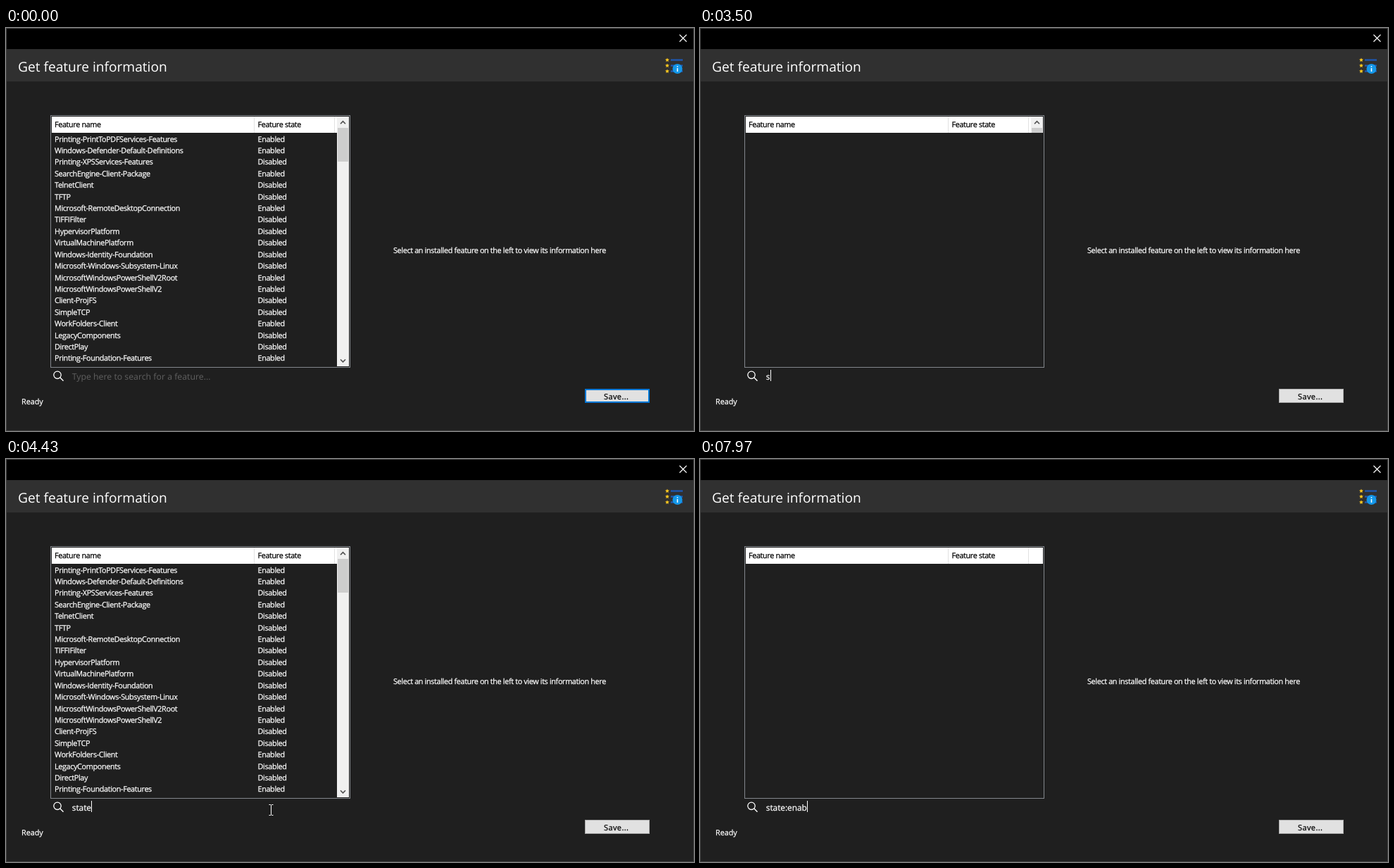
These frames come from a looping animation (977x573 px, 8 s). An HTML page:

```html
<!DOCTYPE html>
<html lang="en">
<head>
<meta charset="utf-8">
<title>Get feature information</title>
<style>
  html, body { margin: 0; width: 100%; height: 100%; overflow: hidden; background: #1f1f1f; }
  svg { display: block; color: #fff; }
  text {
    font: 10.8px "Open Sans", "Noto Sans", sans-serif;
    letter-spacing: -.34px;
    fill: currentColor;
    stroke: currentColor;
    stroke-width: .25px;
    white-space: pre;
    text-rendering: geometricPrecision;
  }
  .head { color: #000; }
  .ui { letter-spacing: 0; }
  .title { font-size: 19.15px; stroke: none; }
  .hint { font-size: 12.3px; color: #606060; stroke: none; }
  .query { font-size: 11.8px; }
  .save { font-size: 11px; letter-spacing: .4px; color: #000; }
  .line { fill: none; stroke: #fff; }
  .chevron { fill: none; stroke: #505050; stroke-width: 1.6; }
</style>
</head>
<body>
<svg width="977" height="573" viewBox="0 0 977 573">
  <rect width="977" height="573" fill="#1f1f1f"/>
  <rect width="977" height="30"/>
  <rect y="30" width="977" height="46" fill="#303030"/>
  <rect class="line" x=".5" y=".5" width="976" height="572" style="stroke:#414141"/>
  <path class="line" d="M956.5 9.5l10 10m0-10l-10 10" stroke-width="1.2"/>
  <text class="ui title" x="17" y="62">Get feature information</text>

  <path d="M944 45.5h17M944 53.5h17M944 61.5h17" stroke="#1f56ab" stroke-width="2.6"/>
  <g id="stars" fill="#ffc91f"></g>
  <circle cx="953.5" cy="58" r="7" fill="#1497e8"/>
  <path d="M953.5 57v5M953.5 54v1.6" stroke="#fff" stroke-width="1.5"/>

  <rect class="line" x="63.5" y="124.5" width="425" height="358" style="stroke:#83878c"/>
  <rect x="65" y="126" width="422" height="23" fill="#fff"/>
  <path d="M352.5 126v23M466.5 126v23" stroke="#e2e2e2"/>
  <text class="head" x="69" y="141">Feature name</text>
  <text class="head" x="357.5" y="141">Feature state</text>
  <g id="rows"></g>

  <g id="barTop">
    <rect x="470" y="126" width="17" height="23" fill="#f0f0f0"/>
    <rect x="471" y="142" width="15" height="7" fill="#cdcdcd"/>
    <path class="chevron" d="M475 136.2l3.5-3.5 3.5 3.5"/>
  </g>
  <g id="barRest">
    <rect x="470" y="149" width="17" height="332" fill="#f0f0f0"/>
    <rect x="471" y="149" width="15" height="41" fill="#cdcdcd"/>
    <path class="chevron" d="M475 471.3l3.5 3.5 3.5-3.5"/>
  </g>

  <circle class="line" cx="73" cy="493.3" r="5.2" stroke-width="1.3"/>
  <path class="line" d="M76.8 497l4.7 4.7" stroke-width="1.4"/>
  <text id="hint" class="ui hint" x="93.7" y="499.5">Type here to search for a feature...</text>
  <text id="query" class="ui query" x="93.8" y="499.5"></text>
  <rect id="caret" y="486" width="1" height="16" fill="#fff"/>

  <text class="ui" x="22" y="535">Ready</text>
  <text x="550" y="319.5">Select an installed feature on the left to view its information here</text>

  <rect x="822.5" y="513.5" width="91" height="19" fill="#e1e1e1" stroke="#adadad"/>
  <rect id="focus" x="823" y="514" width="90" height="18" fill="none" stroke="#0078d7" stroke-width="2"/>
  <text class="save" x="849" y="527.5">Save...</text>

  <g id="pointer">
    <path id="arrow" d="M.5.5v16l3.7-3.5 2.4 5.6 2.3-1-2.4-5.5h5z" fill="#fff" stroke="#000"/>
    <path id="beam" class="line" d="M-3-7.5h2.5M.5-7.5h2.5M-3 7.5h2.5M.5 7.5h2.5M0-7v14"/>
  </g>
</svg>
<script>
const $ = id => document.getElementById(id);
const NS = 'http://www.w3.org/2000/svg';
const LOOP = 8000, TICK = 200 / 3;

// A leading "+" marks an enabled feature.
const features = `+Printing-PrintToPDFServices-Features
+Windows-Defender-Default-Definitions
Printing-XPSServices-Features
+SearchEngine-Client-Package
TelnetClient
TFTP
+Microsoft-RemoteDesktopConnection
TIFFIFilter
HypervisorPlatform
VirtualMachinePlatform
Windows-Identity-Foundation
Microsoft-Windows-Subsystem-Linux
+MicrosoftWindowsPowerShellV2Root
+MicrosoftWindowsPowerShellV2
Client-ProjFS
SimpleTCP
+WorkFolders-Client
LegacyComponents
DirectPlay
+Printing-Foundation-Features`.split('\n');

// time, query, caret, visible rows, scrollbar (0 none, 1 top only, 2 full), pointer
const steps = [
  [0, '', 0, 20, 2, 0],
  [500, '', 0, 20, 2, 1],
  [1300, '', 1, 20, 2, 1],
  [1900, '', 0, 20, 2, 1],
  [2430, '', 1, 20, 2, 1],
  [2965, '', 0, 20, 2, 1],
  [3498, 's', 1, 0, 1, 0],
  [3565, 's', 1, 12, 2, 1],
  [3630, 's', 1, 20, 2, 1],
  [3898, 'st', 1, 0, 1, 0],
  [3965, 'sta', 1, 20, 2, 1],
  [4365, 'stat', 1, 0, 2, 1],
  [4430, 'state', 1, 20, 2, 1],
  [4965, 'state', 0, 20, 2, 1],
  [5230, 'state:', 1, 0, 1, 0],
  [5298, 'state:', 1, 12, 2, 1],
  [5365, 'state:', 1, 20, 2, 1],
  [5765, 'state:', 0, 20, 2, 1],
  [6298, 'state:', 1, 20, 2, 1],
  [6830, 'state:', 0, 20, 2, 1],
  [7365, 'state:e', 1, 0, 1, 0],
  [7430, 'state:e', 1, 0, 0, 1],
  [7565, 'state:en', 1, 0, 0, 0],
  [7698, 'state:ena', 1, 0, 0, 0],
  [7965, 'state:enab', 1, 0, 0, 0]
];

// time, x, y
const path = [
  [500, 630, 562], [700, 532, 515], [900, 430, 489], [1100, 362, 494],
  [1230, 349, 503], [1833, 349, 503], [2030, 377, 499]
];

function add(parent, tag, attrs, content = '') {
  const el = document.createElementNS(NS, tag);
  for (const key in attrs) el.setAttribute(key, attrs[key]);
  el.textContent = content;
  return parent.appendChild(el);
}

function star(cx, cy, r) {
  return Array.from({ length: 10 }, (_, i) => {
    const a = i * Math.PI / 5, k = i % 2 ? r * .45 : r;
    return `${cx + k * Math.sin(a)},${cy - k * Math.cos(a)}`;
  }).join(' ');
}

for (const y of [45.5, 53.5, 61.5]) add($('stars'), 'polygon', { points: star(939, y, 3.1) });

const rows = features.map((line, i) => {
  const on = line[0] === '+', y = 161.5 + i * 16.42;
  const row = add($('rows'), 'g', {});
  add(row, 'text', { x: 69, y }, on ? line.slice(1) : line);
  add(row, 'text', { x: 357.5, y }, on ? 'Enabled' : 'Disabled');
  return row;
});

const clamp = v => Math.min(1, Math.max(0, v));
const show = (el, on) => { el.style.visibility = on ? 'inherit' : 'hidden'; };
const ticks = (t, from) => Math.floor((t - from + 5) / TICK);

function pointerAt(t) {
  const q = 500 + ticks(t, 500) * TICK;
  const i = path.findIndex(p => p[0] > q);
  if (i < 0) return path[path.length - 1].slice(1);
  if (i === 0) return path[0].slice(1);
  const a = path[i - 1], b = path[i], k = (q - a[0]) / (b[0] - a[0]);
  return [1, 2].map(n => a[n] + (b[n] - a[n]) * k);
}

function draw(t) {
  const [, query, caret, count, bar, pointer] = steps.findLast(s => s[0] <= t);
  show($('hint'), t < 1300);
  $('query').textContent = query;
  const width = query ? $('query').getComputedTextLength() : 0;
  $('caret').setAttribute('x', Math.floor(94.5 + width));
  show($('caret'), caret);
  rows.forEach((row, i) => show(row, i < count));
  show($('barTop'), bar > 0);
  show($('barRest'), bar > 1);
  $('focus').style.opacity = 1 - clamp((ticks(t, 1367) + 1) / 6);

  const [x, y] = pointerAt(t).map(Math.round);
  const overField = x < 487 && y > 484 && y < 505;
  $('pointer').setAttribute('transform', `translate(${x - .5} ${y})`);
  show($('pointer'), pointer);
  show($('arrow'), pointer && !overField);
  show($('beam'), pointer && overField);
}

const start = performance.now();
function loop() {
  draw((performance.now() - start) % LOOP);
  requestAnimationFrame(loop);
}
loop();
</script>
</body>
</html>
```
